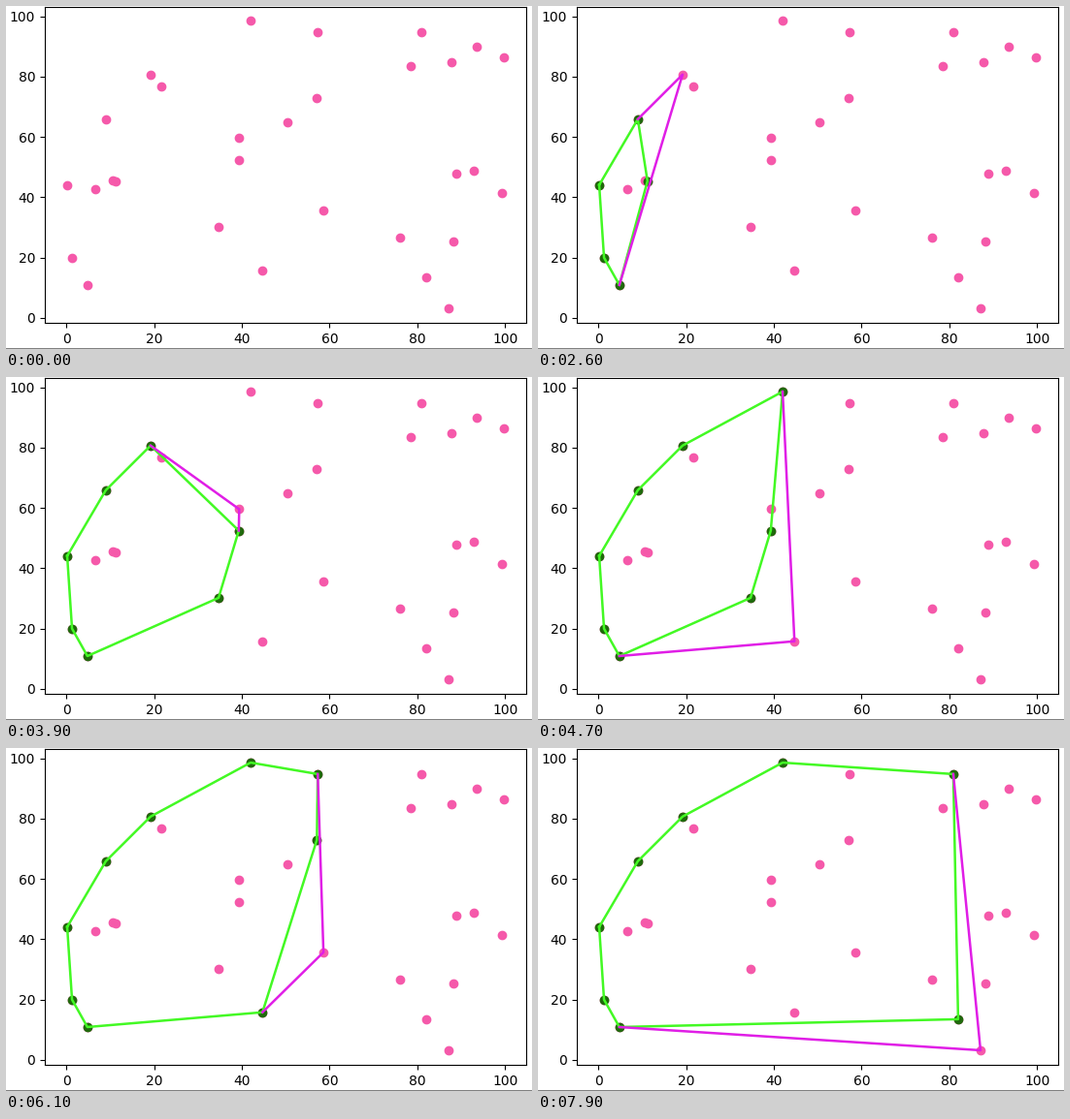
A matplotlib script for the animation above (8 s loop, 542 px wide and 354 px high).

```python
import matplotlib.pyplot as plt
from matplotlib.animation import FuncAnimation
from matplotlib.patches import Rectangle

W, H, DPI = 542, 354, 100
FRAMES, STEP_MS = 80, 100

PINK, DARK = "#f559aa", "#1f6a0c"
GREEN, MAGENTA = "#43f924", "#e01ee6"

# the scattered points, sorted by x: the order in which they join the hull
POINTS = [
    (0.2, 44.1), (1.3, 20.0), (4.8, 10.9), (6.6, 42.8), (9.0, 65.9),
    (10.5, 45.6), (11.2, 45.4), (19.2, 80.7), (21.7, 76.9), (34.7, 30.2),
    (39.3, 52.5), (39.4, 59.6), (42.0, 98.6), (44.7, 15.8), (50.4, 65.0),
    (57.1, 73.0), (57.3, 94.8), (58.6, 35.7), (76.1, 26.7), (78.5, 83.6),
    (80.9, 94.8), (82.0, 13.5), (87.1, 3.2), (87.8, 84.9), (88.2, 25.4),
    (88.9, 47.9), (92.9, 48.9), (93.5, 90.0), (99.3, 41.5), (99.7, 86.5),
]

# times in frames: first triangle, first tangents, one point, its tangents
TRIANGLE_AT, ADD_AT, CYCLE, TANGENT_LEN = 8, 10.6, 3.54, 1.8


def cross(o, a, b):
    return (a[0] - o[0]) * (b[1] - o[1]) - (a[1] - o[1]) * (b[0] - o[0])


def chain(pts):
    out = []
    for p in pts:
        while len(out) > 1 and cross(out[-2], out[-1], p) <= 0:
            out.pop()
        out.append(p)
    return out


def hull(last):
    """Convex hull of the points up to index last, counter-clockwise."""
    pts = POINTS[:last + 1]
    return chain(pts)[:-1] + chain(pts[::-1])[:-1]


def tangents(k):
    """Path from the lower contact through point k to the upper contact."""
    ring = hull(k)
    i = ring.index(POINTS[k])
    return [ring[i - 1], ring[i], ring[(i + 1) % len(ring)]]


def state(frame):
    """Closed hull outline and the tangent path at a frame."""
    if frame < TRIANGLE_AT:
        return [], []
    last, path = 2, []
    if frame >= ADD_AT:
        n, phase = divmod(frame - ADD_AT, CYCLE)
        last = 3 + int(n)
        if phase < TANGENT_LEN:
            path = tangents(last)
            last -= 1
    ring = hull(last)
    return ring + ring[:1], path


plt.rcParams["font.family"] = "DejaVu Sans"
fig = plt.figure(figsize=(W / DPI, H / DPI), dpi=DPI, facecolor="white")
ax = fig.add_axes([40 / W, 26.64 / H, 496 / W, 326.48 / H])
ax.set_xlim(-4.9, 104.8)
ax.set_ylim(-1.75, 103.16)
ax.set_xticks(range(0, 101, 20))
ax.set_yticks(range(0, 101, 20))
fig.add_artist(Rectangle((0, 0), 1, 1 / H, transform=fig.transFigure,
                         facecolor="#808080", linewidth=0))

ax.scatter(*zip(*POINTS), color=PINK, zorder=1)
corners = ax.scatter([], [], color=DARK, zorder=1.5)
edges, = ax.plot([], [], color=GREEN, lw=1.8, zorder=2)
rays, = ax.plot([], [], color=MAGENTA, lw=1.8, zorder=3)


def draw(frame):
    loop, path = state(frame)
    corners.set_offsets(loop[1:] or [(-999, -999)])
    for line, pts in ((edges, loop), (rays, path)):
        line.set_data([x for x, _ in pts], [y for _, y in pts])
    return corners, edges, rays


anim = FuncAnimation(fig, draw, frames=FRAMES, interval=STEP_MS,
                     repeat=True, repeat_delay=0)
plt.show()
```
